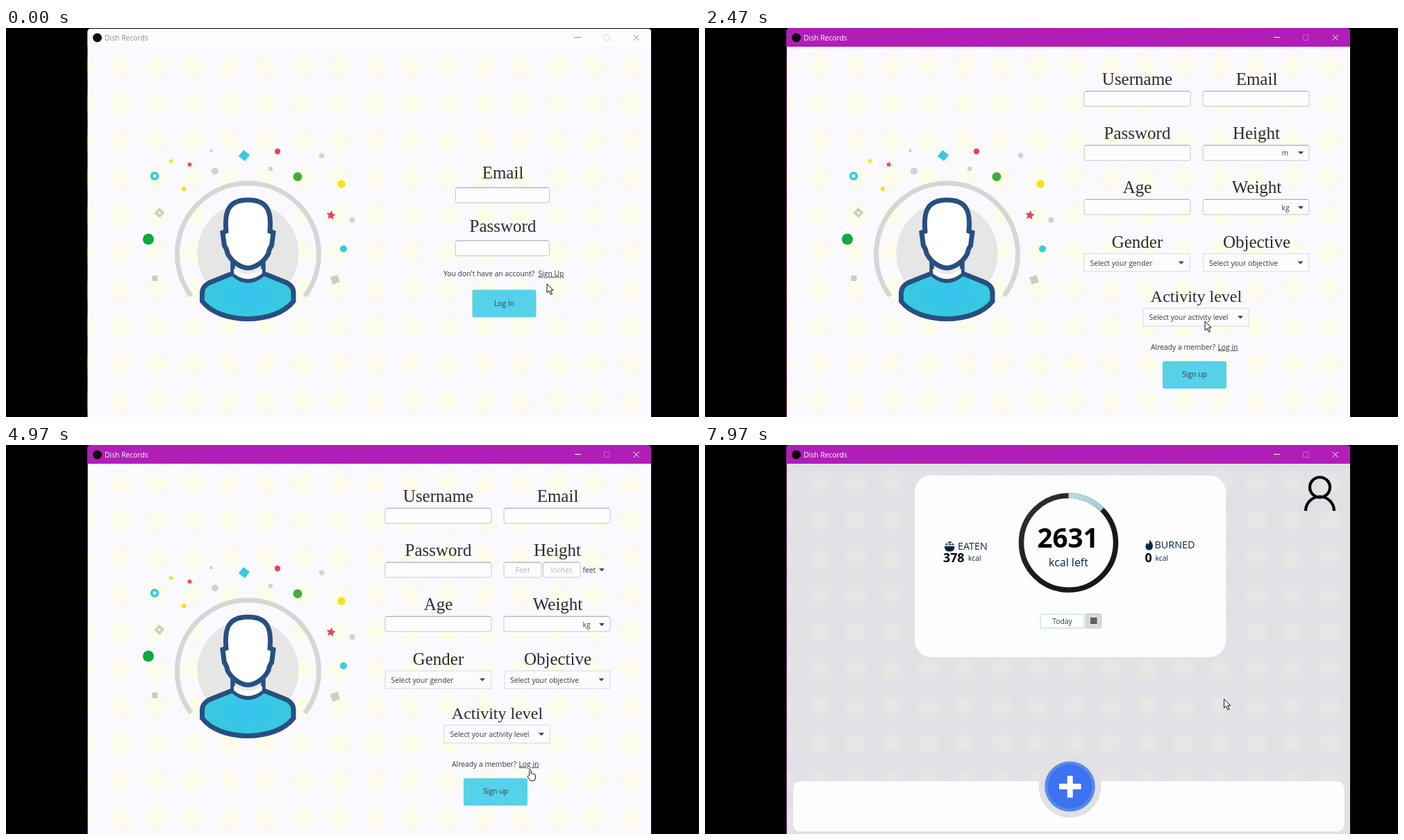
Write an HTML page that moves like this. It is 998 px wide and 561 px high and loops after 8000 ms.

```html
<!DOCTYPE html>
<html lang="en">
<head>
<meta charset="utf-8">
<title>Dish Records</title>
<style>
html, body { margin: 0; width: 100%; height: 100%; overflow: hidden; background: #000; }
svg { display: block; width: 100%; height: 100%; }
text { font: 10.35px "Open Sans", "Noto Sans", sans-serif; fill: #3a3a3c; }
.label { font: 25px "Liberation Serif", serif; fill: #2c2c2c; }
.mid { text-anchor: middle; }
.hint { fill: #b3b3b3; }
.bold { font-weight: 700; fill: #000; }
.navy { fill: #0b2545; }
.link { text-decoration: underline; }
</style>
</head>
<body>
<svg id="stage" viewBox="0 0 998 561"></svg>
<script>
const LOOP = 8000;
const INK = '#284f80', CYAN = '#36cbe0', GREY = '#d2d2d2', RED = '#e5455a', YELLOW = '#f8e219', STONE = '#cdcdc3';

const text = (x, y, s, cls = '', more = '') => `<text x="${x}" y="${y}" class="${cls}" ${more}>${s}</text>`;
const label = (x, y, s, more) => text(x, y, s, 'label mid', more);
const rect = (x, y, w, h, fill, more = '') => `<rect x="${x}" y="${y}" width="${w}" height="${h}" fill="${fill}" ${more}/>`;
const disc = (x, y, r, fill) => `<circle cx="${x}" cy="${y}" r="${r}" fill="${fill}"/>`;
const path = (d, fill, stroke = 'none', width = 1, more = '') =>
  `<path d="${d}" fill="${fill}" stroke="${stroke}" stroke-width="${width}" ${more}/>`;
const group = (id, body) => `<g id="${id}">${body}</g>`;
const tile = (x, y, s, turn, fill) => rect(-s / 2, -s / 2, s, s, fill, `transform="translate(${x} ${y}) rotate(${turn})"`);
const arrow = (x, y) => path(`M${x - 4} ${y - 2}h8l-4 4.2z`, '#454547');
const field = (x, y, w, h = 23) =>
  rect(x + .5, y + .5, w - 1, h - 1, '#fdfdfd', 'rx="3" stroke="#c6c6c9"') +
  path(`M${x + 2} ${y + .9}h${w - 4}`, 'none', '#b2b2b6', 1);
const combo = (x, y, s) =>
  rect(x + .7, y + .7, 152, 25.6, '#fcfcfe', 'stroke="#e2e2e8" stroke-width="1.5"') +
  text(x + 9, y + 17.5, s) + arrow(x + 140.5, y + 13.5);

function star(x, y, r, fill) {
  const points = Array.from({ length: 10 }, (_, i) => {
    const a = i * Math.PI / 5 - 1.4, d = i % 2 ? r * .48 : r;
    return `${(x + d * Math.cos(a)).toFixed(1)},${(y + d * Math.sin(a)).toFixed(1)}`;
  });
  return `<polygon points="${points.join(' ')}" fill="${fill}"/>`;
}

const defs = `<defs>
  <radialGradient id="spot"><stop offset=".35" stop-color="#fdfde0" stop-opacity=".75"/><stop offset="1" stop-color="#fdfde0" stop-opacity="0"/></radialGradient>
  <pattern id="spots" x="138.5" y="28.5" width="52.45" height="53.6" patternUnits="userSpaceOnUse">${disc(26.2, 26.8, 21, 'url(#spot)')}</pattern>
  <linearGradient id="bar" x2=".12" y2=".05" spreadMethod="reflect"><stop stop-color="#b51eae"/><stop offset="1" stop-color="#ad1dc0"/></linearGradient>
  <radialGradient id="shirt"><stop stop-color="#35c3f0"/><stop offset="1" stop-color="#38cadd"/></radialGradient>
  <linearGradient id="button" x2="1" y2=".5"><stop stop-color="#57d3dc"/><stop offset=".6" stop-color="#55d0f0"/><stop offset="1" stop-color="#57d2e2"/></linearGradient>
  <linearGradient id="ring" x2="1" y2="1"><stop stop-color="#343436"/><stop offset=".5" stop-color="#1a1a1b"/><stop offset="1" stop-color="#171718"/></linearGradient>
  <linearGradient id="arc" x2="1"><stop stop-color="#bbdfe0"/><stop offset="1" stop-color="#9fcdd2"/></linearGradient>
  <filter id="shadow" x="-30%" y="-30%" width="160%" height="160%"><feDropShadow dx="0" dy="2" stdDeviation="2.5" flood-opacity=".35"/></filter>
  <clipPath id="emailBox">${rect(654, 231, 123, 21, '#fff')}</clipPath>
</defs>`;

const frame =
  path('M117.5 561V6q0-5 5-5H924q5 0 5 5V561z', '#f9f9fe') +
  rect(117.5, 27, 811.5, 534, 'url(#spots)');

const titleBar =
  group('barOff', path('M117.5 27V6q0-5 5-5H924q5 0 5 5V27z', '#fdfdfe')) +
  group('barOn', path('M117 27V5q0-5 5-5H924q5 0 5 5V27z', 'url(#bar)') + rect(116.8, 27, 1, 534, '#5f1763')) +
  disc(131.5, 14, 6.5, '#0c0c0c') +
  text(142, 17.8, 'Dish Records', '', 'id="title"') +
  `<g id="controls" fill="none">
    <path d="M819 13.5h9M903.8 9.8l8 8m0-8l-8 8"/>
    <rect x="861.5" y="10.2" width="7.5" height="7.5" opacity=".3"/>
  </g>`;

const avatar =
  path('M266.5 386.5A102 102 0 1 1 430.5 386.5', 'none', '#d6d6d6', 7) +
  disc(348.5, 325, 73, '#e6e6e6') +
  rect(326, 332, 45, 28, '#e9ebec') +
  path('M326 354Q348 374 371 354L401 366Q414 371 414 382V394C388 428 308 428 282.500 394V382Q283 371 296 366Z', 'url(#shirt)', INK, 7) +
  path('M326.500 334V354Q348 374 370.500 354V334', 'none', INK, 6.5) +
  path('M328 347Q349 363 369 347L369 354Q348 370 328 354Z', '#fdfdfd') +
  path('M317 293C314 262 322 248 348.500 248S383 262 380 293L385 295L382.500 314Q379 318 378 325C371 339 357 346 348.500 346S326 339 319 325Q318 318 314.500 314L312 295Z', '#fff', INK, 7);

const confetti =
  tile(343, 184, 11.5, 38, CYAN) + tile(474, 363, 11, -18, STONE) + tile(214.5, 361, 8, 0, STONE) +
  tile(295.5, 177, 4, 10, STONE) + tile(221, 266.5, 10.5, 42, STONE) + disc(221, 266.5, 2, '#f9f9fe') +
  star(237.5, 192, 4.3, YELLOW) + star(264.5, 197, 4.3, RED) + star(468, 270, 7, RED) +
  disc(391, 178, 4.2, RED) + disc(256, 232, 3.2, YELLOW) + disc(483, 225, 5.8, YELLOW) +
  disc(420, 214.5, 6.5, '#40ad3c') + disc(205, 304.5, 8, '#0bab3c') + disc(486, 318.5, 5, CYAN) +
  disc(214, 213.5, 6.2, CYAN) + disc(214, 213.5, 2.4, '#f9f9fe') +
  [[301, 206.5, 5], [381, 203, 3.2], [454.5, 184, 3.8], [498.5, 277, 4]].map(([x, y, r]) => disc(x, y, r, GREY)).join('');

const dots = Array.from({ length: 9 }, (_, i) => disc(658.3 + i * 6.55, 318.8, 2.5, '#333')).join('');

const login = group('login',
  label(715.5, 217, 'Email') + field(647, 229.5, 136) +
  label(715.5, 294, 'Password') + field(647, 306, 136) +
  text(630, 357.7, 'You don\'t have an account?') + text(766.5, 357.7, 'Sign Up', 'link') +
  group('filled', text(655, 245, 'lunarivosteracci@plimon', '', 'clip-path="url(#emailBox)"') + dots) +
  `<rect id="loginButton" rx="2.500" fill="url(#button)"/>` +
  text(717.5, 401, 'Log In', 'mid', 'id="loginText"'));

const signup = group('signup',
  label(622.5, 82, 'Username') + field(545.5, 90.5, 154) +
  label(794.5, 82, 'Email') + field(716.5, 90.5, 154) +
  label(622.5, 160, 'Password') + field(545.5, 168.5, 154) +
  label(794, 160, 'Height') +
  label(622.5, 238, 'Age') + field(545.5, 246.500, 154) +
  label(794.5, 238, 'Weight') + field(716.5, 246.500, 154) +
  group('metres', field(716.5, 168.5, 154) + text(830.5, 183.5, 'm')) +
  group('feet', field(716.5, 168.5, 55) + field(773, 168.5, 54.5) +
    text(744, 184, 'Feet', 'mid hint') + text(800, 184, 'Inches', 'mid hint') + text(830.5, 183.5, 'feet')) +
  arrow(858, 180) + text(830.5, 262.5, 'kg') + arrow(858, 259) +
  label(622.5, 316.5, 'Gender') + combo(545.5, 325, 'Select your gender') +
  label(794.5, 316.5, 'Objective') + combo(717, 325, 'Select your objective') +
  label(707.5, 395, 'Activity level', 'style="font-size:24px"') + combo(630.5, 403.5, 'Select your activity level') +
  text(642, 463.7, 'Already a member?') + text(738.5, 463.7, 'Log in', 'link') +
  rect(659, 480.5, 92, 39.5, 'url(#button)', 'rx="2.500"') + text(705, 503.3, 'Sign up', 'mid') +
  group('menu', rect(826, 166, 48, 52, '#fdfdfd', 'stroke="#b9b9bd" filter="url(#shadow)"') +
    '<rect id="pick" x="826" width="48" height="23" fill="#0f9bc3"/>' +
    path('M832 180.5l2.6 4 5-8.5', 'none', '#333', 1.8, 'id="tick"') +
    text(844.5, 184, 'm', '', 'id="itemM"') + text(844.5, 207, 'feet', '', 'id="itemFeet"')));

const bowl =
  path('M345 146h14.500q0 7-5 7.500h-4.500q-5-.5-5-7.500z', '#0b2545') +
  path('M346 144.500q0-3 3-3 1-3 4-2.500 3 0 3 3 3-.5 3 2.500z', '#3d526b') +
  disc(350, 142.5, 1.3, '#fdfdfe') + disc(354.5, 142, 1.3, '#fdfdfe');
const flame = path('M640 136.500q5 5 5 9 0 6-5.500 6-5 0-5-5.500 0-3 2.500-5 .5 2 1.500 2.500 2-3 1.500-7z', '#0b2545');

const dashboard = group('dashboard',
  rect(117.8, 27, 811.2, 534, '#e1e1e5') +
  rect(117.8, 27, 811.2, 534, 'url(#spots)', 'opacity=".25"') +
  rect(302, 44, 448, 262, '#fdfdfe', 'rx="24"') +
  '<circle cx="523.500" cy="141" r="68" fill="none" stroke="url(#ring)" stroke-width="7.500"/>' +
  path('M523.500 73A68 68 0 0 1 571.800 93.100', 'none', 'url(#arc)', 7.5) +
  text(522.5, 148, '2631', 'bold mid', 'style="font-size:38.500px"') +
  text(523.5, 175.3, 'kcal left', 'navy mid', 'style="font-size:16px"') +
  bowl + text(364, 151.3, 'EATEN', 'navy', 'style="font-size:14.400px"') +
  text(343, 169.3, '378', 'bold', 'style="font-size:17.800px"') + text(379, 167, 'kcal', 'navy') +
  flame + text(647.5, 149.3, 'BURNED', 'navy', 'style="font-size:14.400px"') +
  text(633.5, 168.8, '0', 'bold', 'style="font-size:17.800px"') + text(648.5, 167, 'kcal', 'navy') +
  rect(483, 244, 63, 20, '#fefefe', 'stroke="#d3e9f7" stroke-width="1.800"') + text(514.5, 258, 'Today', 'mid') +
  rect(548.5, 243.5, 22, 20.5, '#d9d9db', 'rx="1.500" stroke="#c4c4c6"') +
  rect(555, 249, 9.5, 9, '#55575a') + path('M555 252.200h9.500m-9.500 2.800h9.500', 'none', '#8b8d90', .6) +
  '<circle cx="885.500" cy="61" r="14.500" fill="none" stroke="#000" stroke-width="4.200"/>' +
  path('M865 95A20.500 20.500 0 0 1 906 95', 'none', '#000', 4.2) +
  rect(127, 485, 793.5, 72.5, '#fdfdfe', 'rx="10"') +
  disc(525.5, 492.5, 45, '#e1e1e5') + disc(525.5, 492.5, 36.3, '#5a8ae6') + disc(525.5, 492.5, 32, '#3b73f1') +
  path('M510 492.500h31.500M525.700 477v31.500', 'none', '#fff', 8));

const cursor = group('cursor',
  path('M0 0V12.800L3 10L5.400 15.500L7.500 14.600L5.200 9.200H9.200Z', '#fff', '#111', 1, 'id="pointer"') +
  path('M-1.300 8V1Q-1.300-.3 0-.3T1.300 1V5.500Q2.600 4.600 3.700 5.900 5 5.200 5.800 6.400 7.500 6 7.500 8V11.500Q7 13.500 6 15.500H0Q-1.500 12.800-3.500 10.500-4.300 8.700-2.700 8.500Z', '#fff', '#111', 1, 'id="hand"'));

document.getElementById('stage').innerHTML =
  defs + frame + avatar + confetti + login + signup + dashboard + titleBar + cursor;

const el = {};
document.querySelectorAll('#stage [id]').forEach(n => el[n.id] = n);
const show = (id, on) => el[id].setAttribute('display', on ? 'inline' : 'none');
const set = (id, attrs) => { for (const k in attrs) el[id].setAttribute(k, attrs[k]); };
const within = (t, a, b) => t >= a && t < b;

// time, x, y of the pointer tip
const track = [
  [0, 779, 369], [100, 779, 369], [650, 786, 347], [1500, 786, 347], [2400, 720, 423], [2560, 720, 423],
  [3270, 855, 178], [3430, 855, 178], [3720, 849.5, 206], [3960, 849.5, 206], [4900, 755, 468.500],
  [5230, 755, 468.500], [5730, 690.500, 384], [6200, 690.500, 384], [7000, 706, 394], [7680, 706, 394], [7950, 747.500, 366.500]
];

function tip(t) {
  const i = track.findIndex(k => k[0] > t);
  if (i < 0) return track[track.length - 1].slice(1);
  const [t0, x0, y0] = track[i - 1], [t1, x1, y1] = track[i];
  const u = (t - t0) / (t1 - t0), e = u * u * (3 - 2 * u);
  return [x0 + (x1 - x0) * e, y0 + (y1 - y0) * e];
}

function draw(t) {
  const [x, y] = tip(t);
  const active = t >= 700;
  const home = t >= 7750, joining = within(t, 950, 5200);
  const feet = t >= 3960, onFeet = y > 192;
  const overButton = !joining && within(x, 672, 763) && within(y, 378, 417);
  const hand = within(t, 450, 950) || within(t, 4860, 5200) || (overButton && !home);

  show('barOff', !active);
  show('barOn', active);
  set('title', { style: `fill:${active ? '#fff' : '#8c8c90'}` });
  set('controls', { stroke: active ? '#fff' : '#8c8c90' });

  show('login', !joining && !home);
  show('signup', joining);
  show('dashboard', home);
  show('filled', t >= 6000);

  set('loginButton', overButton
    ? { x: 669.5, y: 376.5, width: 96.5, height: 41 }
    : { x: 671.5, y: 377.5, width: 92, height: 39.5 });
  set('loginText', { style: overButton ? 'font-size:10.800px;fill:#4b5a60' : '' });

  show('metres', !feet);
  show('feet', feet);
  show('menu', within(t, 3430, 3960));
  set('pick', { y: onFeet ? 192 : 169 });
  set('tick', { stroke: onFeet ? '#333' : '#fff' });
  set('itemM', { style: onFeet ? '' : 'fill:#fff' });
  set('itemFeet', { style: onFeet ? 'fill:#fff' : '' });

  show('pointer', !hand);
  show('hand', hand);
  set('cursor', { transform: `translate(${x.toFixed(2)} ${y.toFixed(2)})` });
}

function tick() {
  draw(performance.now() % LOOP);
  requestAnimationFrame(tick);
}
tick();
</script>
</body>
</html>
```
